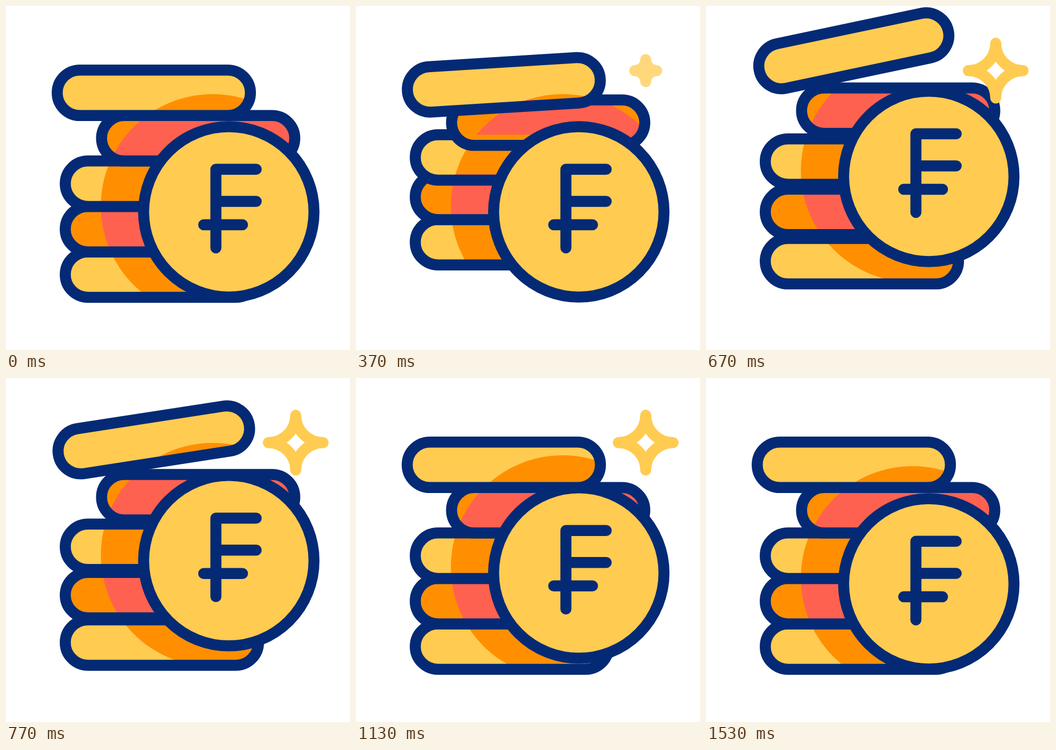
An HTML page with a canvas for the animation above (2000 ms loop, 640x640 px).

```html
<!DOCTYPE html>
<html lang="en">
<head>
<meta charset="utf-8">
<title>Coin stack</title>
<style>
html, body { margin: 0; width: 100%; height: 100%; overflow: hidden; background: #fff; }
canvas { display: block; width: 640px; height: 640px; }
</style>
</head>
<body>
<canvas id="stage" width="640" height="640"></canvas>
<script>
const ctx = document.getElementById('stage').getContext('2d');
const LOOP = 2000;
const NAVY = '#042a75', YELLOW = '#ffcb51', ORANGE = '#ff8f00', RED = '#ff6150';
const LINE = 20.5;
const PILL_W = 359.5, PILL_H = 84.55;
const PILL_X = [290, 290, 290, 357.5, 275]; // bottom to top
const TOP = PILL_X.length - 1;

const clamp = v => Math.min(1, Math.max(0, v));
const ramp = (v, a, b) => clamp((v - a) / (b - a));
const ease = (v, a, b) => { const u = ramp(v, a, b); return u * u * (3 - 2 * u); };
const hop = (v, mid, half, height) => height * ease(half - Math.abs(v - mid), 0, half);

// Each pill leaves about two ticks after the one below; the top one is tossed higher.
function pillLift(i, tick) {
  const height = i === TOP ? 79 : 60.3;
  const rise = i === TOP ? 7.85 : 8.6;
  const leave = 0.75 + 2.02 * i;
  return height * (ease(tick, leave, leave + rise) - ease(tick, 12.4 + 1.78 * i, 26 + 0.35 * i));
}

function pillPath(x, y, tilt) {
  const local = new Path2D(), path = new Path2D();
  local.roundRect(-PILL_W / 2, -PILL_H / 2, PILL_W, PILL_H, PILL_H / 2);
  path.addPath(local, new DOMMatrix().translate(x, y).rotate(tilt));
  return path;
}

function circle(x, y, r) {
  ctx.beginPath();
  ctx.arc(x, y, r, 0, Math.PI * 2);
}

function shade(color, coinY, ...clips) {
  ctx.save();
  clips.forEach(path => ctx.clip(path));
  circle(384.5, coinY - 11, 208);
  ctx.fillStyle = color;
  ctx.fill();
  ctx.restore();
}

function drawStack(tick, coinY) {
  const topTilt = -11.9 * Math.min(ramp(tick, 7.2, 20), 1 - ease(tick, 20.2, 28.5));
  let below = null;
  PILL_X.forEach((x, i) => {
    const [light, dark] = i % 2 ? [ORANGE, RED] : [YELLOW, ORANGE];
    const y = 499.7 - i * PILL_H - pillLift(i, tick);
    const path = pillPath(x, y, i === TOP ? topTilt : 0);
    ctx.fillStyle = light;
    ctx.fill(path);
    shade(dark, coinY, path);
    // The lower pill's shade stays on top where two pills overlap.
    if (below) shade(below.dark, coinY, path, below.path);
    ctx.stroke(path);
    below = { path, dark };
  });
}

function drawCoin(y) {
  circle(414.5, y, 158.5);
  ctx.fillStyle = YELLOW;
  ctx.fill();
  ctx.stroke();
  ctx.stroke(new Path2D(
    `M465.5 ${y - 79.2}H390.5V${y + 67}M390.5 ${y - 19.5}H465.5M367.8 ${y + 24}H440`));
}

function drawSparkle(tick) {
  const t = Math.min(tick, 54.5 - tick); // leaves the way it came
  const alpha = ramp(t, 8, 12);
  if (!alpha) return;
  const r = 67 * ease(t, 8.5, 15.3) - 16 * ease(t, 15.3, 20);
  ctx.save();
  ctx.globalAlpha = alpha;
  ctx.translate(539, 120.2);
  ctx.strokeStyle = YELLOW;
  const star = new Path2D();
  for (let i = 0; i < 4; i++) {
    const arm = new Path2D(`M0 ${-r}A${r} ${r} 0 0 0 ${r} 0`);
    star.addPath(arm, new DOMMatrix().rotate(90 * i));
  }
  ctx.stroke(star);
  ctx.restore();
}

function draw(ms) {
  const tick = Math.floor((ms % LOOP + 3.4) * 0.03);
  const coinY = 383 - hop(tick, 19.95, 7.7, 66) - hop(tick, 34.7, 7.1, 20.7);
  ctx.fillStyle = '#fff';
  ctx.fillRect(0, 0, 640, 640);
  ctx.strokeStyle = NAVY;
  ctx.lineWidth = LINE;
  ctx.lineCap = ctx.lineJoin = 'round';
  drawStack(tick, coinY);
  drawCoin(coinY);
  // At tick 46 the sparkle is already gone.
  if (tick < 46) drawSparkle(tick);
}

const start = performance.now();
function loop() {
  draw(performance.now() - start);
  requestAnimationFrame(loop);
}
loop();
</script>
</body>
</html>
```
